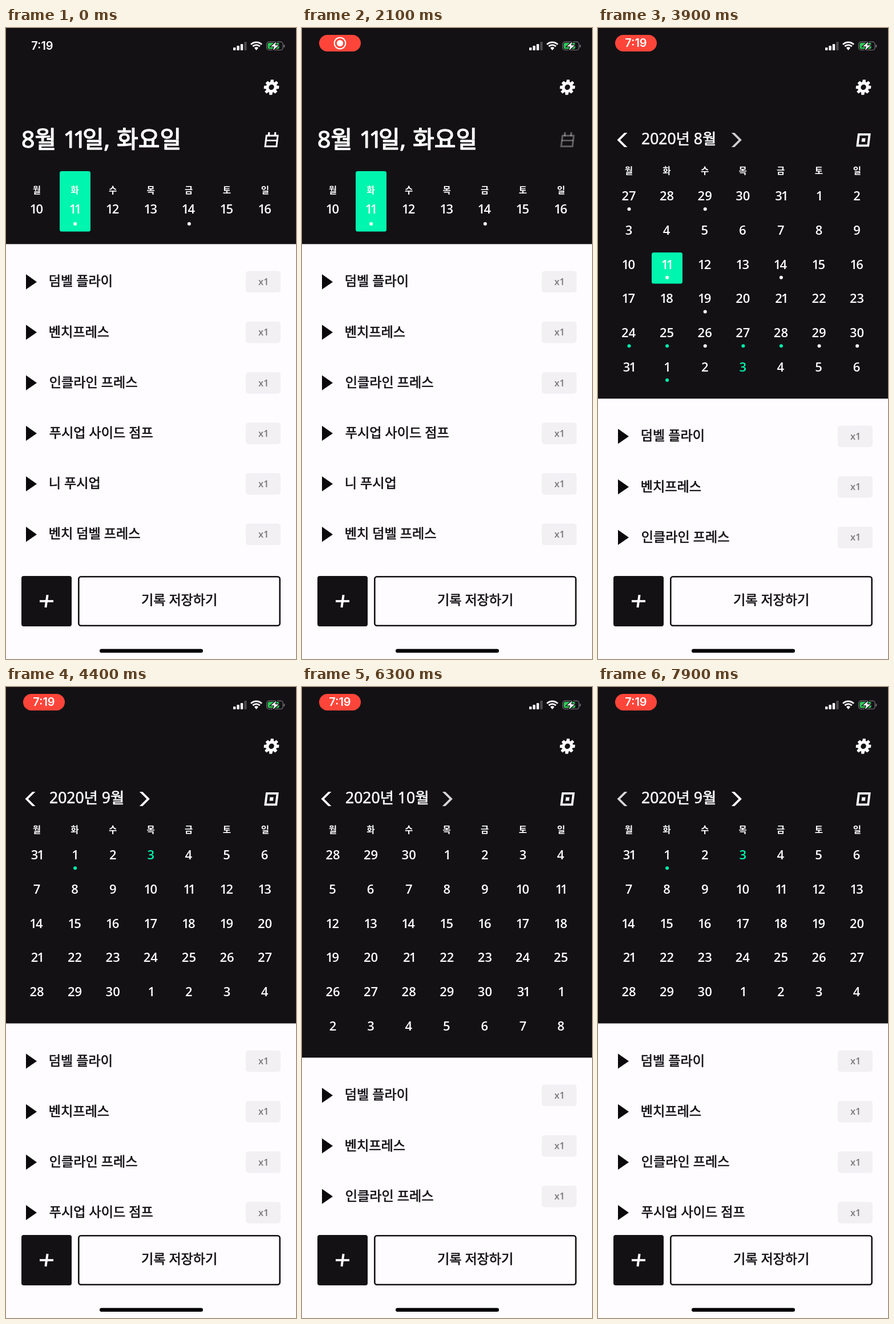
An HTML page with a canvas for the animation above (8000 ms loop, 508 px wide and 1102 px high).

```html
<!DOCTYPE html>
<html lang="ko">
<head>
<meta charset="utf-8">
<style>
html, body { margin: 0; width: 100%; height: 100%; overflow: hidden; background: #fefcff; }
canvas { display: block; }
</style>
</head>
<body>
<canvas id="stage" width="508" height="1102"></canvas>
<script>
const ctx = document.getElementById('stage').getContext('2d');
const LOOP = 8000, STEP = 100;
const DARK = '#131114', LIGHT = '#fefcff', GREEN = '#00f5ae', WHITE = '#fff';
const FAMILY = '"Open Sans", "Noto Sans CJK KR", "Noto Sans CJK", sans-serif';
const DAYS = [...'월화수목금토일'];
const EXERCISES = ['덤벨 플라이', '벤치프레스', '인클라인 프레스', '푸시업 사이드 점프', '니 푸시업', '벤치 덤벨 프레스'];
const TODAY = new Date(2020, 8, 3).getTime();

// Cell indexes that carry a marker
const AUGUST = { month: 7, rows: 6, selected: 15, white: [0, 2, 15, 18, 23, 30, 33, 34], green: [28, 29, 31, 32, 36] };
const AUGUST_LOADING = { ...AUGUST, white: [15, 18], green: [] };
const SEPTEMBER = { month: 8, rows: 5, white: [], green: [1] };
const OCTOBER = { month: 9, rows: 6, white: [], green: [] };
const VIEWS = [[0, null], [2200, AUGUST_LOADING], [2500, AUGUST], [4000, SEPTEMBER], [6300, OCTOBER], [7900, SEPTEMBER]];
// Moments when a finger lifts off a control
const TAPS = { toggle: [2030], next: [3740, 6130], back: [7730] };

const clamp = v => Math.max(0, Math.min(1, v));
const ease = p => p < 0.5 ? 2 * p * p : 1 - 2 * (1 - p) ** 2;
const colX = c => 53.7 + 66.6 * c;

// Opacity of a tapped control: quick fade down, slower fade back
function tapAlpha(t, releases) {
  return Math.min(...releases.map(release => {
    const d = t - release;
    return 1 - 0.8 * (d < 0 ? ease(clamp(1 + d / 150)) : 1 - ease(clamp(d / 250)));
  }));
}

// x is the left edge or the centre of the visible ink; swell thickens strokes, in em
function text(str, x, y, size, { weight = 500, color = WHITE, align = 'center', family = FAMILY, spacing = 0, swell = 0 } = {}) {
  ctx.font = `${weight} ${size}px ${family}`;
  ctx.letterSpacing = spacing + 'px';
  const m = ctx.measureText(str);
  const left = m.actualBoundingBoxLeft, right = m.actualBoundingBoxRight;
  const start = align === 'left' ? x + left : x - (right - left) / 2;
  ctx.fillStyle = ctx.strokeStyle = color;
  ctx.fillText(str, start, y);
  if (swell) {
    ctx.lineWidth = size * swell;
    ctx.lineJoin = 'round';
    ctx.strokeText(str, start, y);
    ctx.lineJoin = 'miter';
  }
  ctx.letterSpacing = '0px';
}

// Numbers are set with a narrow 1
function number(n, x, y, size, options) {
  const ones = String(n).split('1').length - 1;
  text(String(n), x, y, size, { ...options, spacing: -0.08 * size * ones });
}

function box(x, y, w, h, r, color) {
  ctx.fillStyle = color;
  ctx.beginPath();
  ctx.roundRect(x, y, w, h, r);
  ctx.fill();
}

function dot(x, y, r, color) {
  ctx.fillStyle = color;
  ctx.beginPath();
  ctx.arc(x, y, r, 0, Math.PI * 2);
  ctx.fill();
}

function trace(points, close = true) {
  ctx.beginPath();
  points.forEach(([x, y]) => ctx.lineTo(x, y));
  if (close) ctx.closePath();
}

function polygon(points, color) {
  trace(points);
  ctx.fillStyle = color;
  ctx.fill();
}

function line(points, width, color, close = false) {
  trace(points, close);
  ctx.lineWidth = width;
  ctx.strokeStyle = color;
  ctx.stroke();
}

function faded(alpha, draw) {
  ctx.save();
  ctx.globalAlpha = alpha;
  draw();
  ctx.restore();
}

function drawClock(x, y) {
  text('7:19', x, y, 20, { weight: 600, family: 'Inter, sans-serif' });
}

function drawRecordingPill(t) {
  const shown = clamp((t - 450) / 300);
  if (shown < 1) faded(1 - shown, () => drawClock(63, 38));
  if (!shown) return;
  const wave = 242 + 26 * Math.cos((t - 2200) / 1920 * Math.PI * 2);
  const k = Math.min(255, wave) / 255;
  const swap = clamp((t - 2950) / 300);
  faded(shown, () => {
    box(30, 12, 73, 29, 14.5, `rgb(${255 * k},${69 * k},${58 * k})`);
    if (swap > 0) faded(shown * swap, () => drawClock(66, 33.3));
    if (swap < 1) faded(shown * (1 - swap), () => {
      ctx.strokeStyle = WHITE;
      ctx.lineWidth = 2;
      ctx.beginPath();
      ctx.arc(66.5, 26.5, 9.8, 0, Math.PI * 2);
      ctx.stroke();
      dot(66.5, 26.5, 5.6, WHITE);
    });
  });
}

function drawStatusIcons() {
  [5, 8, 11, 15].forEach((h, i) => box(398 + 6.4 * i, 39 - h, 4.4, h, 1, i < 3 ? WHITE : '#4b494c'));

  ctx.strokeStyle = WHITE;
  ctx.lineWidth = 2.9;
  for (const r of [13.4, 8.7]) {
    ctx.beginPath();
    ctx.arc(438.5, 38.3, r, -Math.PI * 0.75, -Math.PI * 0.25);
    ctx.stroke();
  }
  ctx.beginPath();
  ctx.moveTo(438.5, 39);
  ctx.arc(438.5, 38.3, 5, -Math.PI * 0.75, -Math.PI * 0.25);
  ctx.fillStyle = WHITE;
  ctx.fill();

  ctx.strokeStyle = '#77757a';
  ctx.lineWidth = 1.2;
  ctx.beginPath();
  ctx.roundRect(456.6, 24.1, 28.6, 14.4, 4.3);
  ctx.stroke();
  box(486.5, 29, 1.8, 5, 1, '#77757a');
  box(458.5, 26, 20, 10.6, 2.5, '#32c759');
  const bolt = [[473.5, 24], [464, 32.3], [470, 32.3], [467.7, 39], [477.5, 30.3], [471.3, 30.3]];
  line(bolt, 2.5, DARK, true);
  polygon(bolt, WHITE);
}

function drawGear() {
  ctx.save();
  ctx.transform(1, 0, -0.1, 1, 465, 103.5);
  for (let i = 0; i < 8; i++) {
    ctx.rotate(Math.PI / 4);
    polygon([[-3.2, -7], [-2.5, -13.2], [2.5, -13.2], [3.2, -7]], WHITE);
  }
  ctx.strokeStyle = WHITE;
  ctx.lineWidth = 5;
  ctx.beginPath();
  ctx.arc(0, 0, 7.2, 0, Math.PI * 2);
  ctx.stroke();
  ctx.restore();
}

function drawCalendarIcon() {
  line([[456.3, 188], [476, 188], [473.8, 206.7], [454, 206.7]], 3, WHITE, true);
  line([[455, 196.5], [475, 196.5]], 2.6, WHITE);
  line([[460.9, 182], [460, 189]], 3.2, WHITE);
  line([[471.9, 182], [471, 189]], 3.2, WHITE);
}

function drawWeekIcon() {
  line([[456.8, 185.8], [475.6, 185.8], [473.2, 205.4], [454.4, 205.4]], 3.8, WHITE, true);
  polygon([[462.4, 192.4], [468.6, 192.4], [467.8, 198.8], [461.6, 198.8]], WHITE);
}

function drawChevron(x, dir) {
  const points = [[3.6, -12.5], [9, -12.5], [-3.6, 0], [9, 12.5], [3.6, 12.5], [-9, 0]];
  polygon(points.map(([px, py]) => [x + px * dir, 195.5 + py]), WHITE);
}

function drawDate(n, c, y, color = WHITE) {
  number(n, colX(c), y, 22, { weight: 600, color });
}

function drawDayNames(y) {
  DAYS.forEach((d, c) => text(d, colX(c), y, 15.5, { weight: 700 }));
}

function drawWeek() {
  const title = { align: 'left', swell: 0.035 };
  text('8월', 29, 208.5, 41, title);
  number(11, 103.5, 208.5, 41, title);
  text('일,', 136, 208.5, 41, title);
  text('화요일', 195, 208.5, 41, title);
  box(94, 250, 54, 105.5, 3.5, GREEN);
  drawDayNames(288.5);
  DAYS.forEach((_, c) => drawDate(10 + c, c, 324));
  [1, 4].forEach(c => dot(colX(c) + 0.8, 342, 3, WHITE));
}

function drawMonth(view, t) {
  text(`2020년 ${view.month + 1}월`, 77, 203, 26.5, { align: 'left', swell: 0.025 });
  faded(tapAlpha(t, TAPS.back), () => drawChevron(42.5, 1));
  faded(tapAlpha(t, TAPS.next), () => drawChevron(view.month === 9 ? 254.8 : 242.8, -1));
  drawDayNames(254.5);

  const lead = (new Date(2020, view.month, 1).getDay() + 6) % 7;
  for (let i = 0; i < view.rows * 7; i++) {
    const c = i % 7, y = 293 + 59.75 * Math.floor(i / 7);
    const date = new Date(2020, view.month, 1 - lead + i);
    if (i === view.selected) box(94, y - 20.5, 54, 54.5, 3.5, GREEN);
    drawDate(date.getDate(), c, y + 8, date.getTime() === TODAY ? GREEN : WHITE);
    const mark = view.white.includes(i) ? WHITE : view.green.includes(i) ? GREEN : null;
    if (mark) dot(colX(c) + 0.8, y + 23.3, 3, mark);
  }
}

function drawExercises(top) {
  EXERCISES.forEach((name, i) => {
    const y = top + 65.7 + 88.2 * i;
    polygon([[35, y - 13], [54, y + 0.3], [35, y + 13.3]], '#0b090c');
    text(name, 76.7, y + 7.3, 23.1, { color: DARK, align: 'left', swell: 0.03 });
    box(420, y - 18.5, 61, 37.5, 5, '#f2f0f3');
    text('x1', 450, y + 6, 16.5, { weight: 600, color: '#79777a' });
  });
}

function drawFooter() {
  ctx.fillStyle = LIGHT;
  ctx.fillRect(0, 945, 508, 157);
  box(27, 957, 88, 88, 4, DARK);
  line([[59, 1001], [83, 1001]], 3.8, WHITE);
  line([[72.6, 990], [69.4, 1012]], 4, WHITE);
  ctx.strokeStyle = DARK;
  ctx.lineWidth = 2.6;
  ctx.beginPath();
  ctx.roundRect(127.3, 958.3, 352.4, 85.4, 4);
  ctx.stroke();
  text('기록 저장하기', 303, 1007.3, 23.1, { color: DARK, swell: 0.03 });
  box(164, 1084.5, 181, 6.5, 3.2, '#000');
}

function render(t) {
  const view = VIEWS.filter(([start]) => t >= start).pop()[1];
  const top = view ? 288.5 + 59.8 * view.rows : 377.4;
  ctx.fillStyle = LIGHT;
  ctx.fillRect(0, 0, 508, 1102);
  ctx.fillStyle = DARK;
  ctx.fillRect(0, 0, 508, top);
  drawRecordingPill(t);
  drawStatusIcons();
  drawGear();
  if (view) drawMonth(view, t);
  else drawWeek();
  faded(tapAlpha(t, TAPS.toggle), view ? drawWeekIcon : drawCalendarIcon);
  drawExercises(top);
  drawFooter();
}

function tick() {
  const t = performance.now() % LOOP;
  render(Math.floor(t / STEP) * STEP);
  requestAnimationFrame(tick);
}
tick();
</script>
</body>
</html>
```
